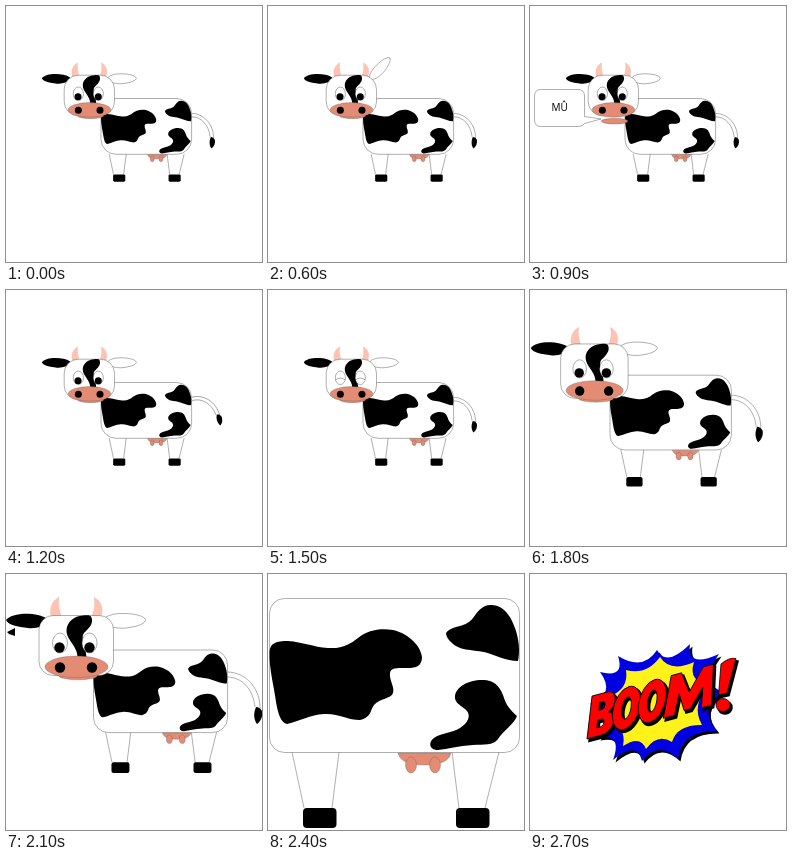
An HTML page that plays this animation: 256 by 256 pixels, repeating every 3 s.

```html
<!DOCTYPE html>
<html lang="en">
<head>
<meta charset="utf-8">
<title>Cow</title>
<style>
html, body { margin: 0; width: 100%; height: 100%; overflow: hidden; background: #fff; }
svg { display: block; width: 100%; height: 100%; }
#cow *, #bubble path { vector-effect: non-scaling-stroke; }
.line { fill: #fff; stroke: #000; stroke-width: .32; }
.open { fill: none; stroke: #000; stroke-width: .32; }
.skin { fill: #e38b73; stroke: #555; stroke-width: .3; }
.horn { fill: #ffc2b3; stroke: #d99; stroke-width: .2; }
text { font: 10px "Open Sans", "Noto Sans", sans-serif; }
</style>
</head>
<body>
<svg viewBox="0 0 256 256">
  <defs>
    <g id="letters" fill-rule="evenodd">
      <g transform="matrix(1.03 -.28 -.13 1.1 57 165)">
        <path d="M0 0V-39H14C26 -39 26 -23 18 -20C28 -18 27 0 14 0ZM8.500 -31V-24H11C15 -24 15 -31 11 -31ZM8.500 -15V-8H12C16 -8 16 -15 12 -15Z"/>
        <path id="o" d="M22.500 -19a13.500 19.500 0 1 1 27 0a13.500 19.500 0 1 1 -27 0ZM31.500 -19a4.500 10 0 1 0 9 0a4.500 10 0 1 0 -9 0Z"/>
        <use href="#o" x="25"/>
        <path d="M74 0L77 -38H87L97 -18L108 -38H118L121 0H111L110 -19L100 -2H94L87 -19L85 0Z"/>
      </g>
      <path d="M191 90Q199 83 206 84.500L197 119L188.500 121Z"/>
      <ellipse cx="193" cy="131" rx="7" ry="6.500"/>
    </g>
    <path id="burst"/>
  </defs>

  <g id="cow">
    <g id="tail">
      <g transform="translate(35.88 41.15) scale(.6757)">
        <path class="open" d="M221 98C240 98 255 115 254 136M221 103C236 103 247 115 249 133"/>
        <path d="M250 133C247 140 248 146 251 150C255 147 257 142 256 137C254 134 252 133 250 133Z"/>
      </g>
    </g>
    <g transform="translate(94.46 83.62) scale(.3623)">
      <path class="open" d="M24 178L36 234M71 178L64 234M184 178L191 234M231 178L217 234"/>
      <rect x="35" y="234" width="33.5" height="20" rx="4"/>
      <rect x="188" y="234" width="33.5" height="20" rx="4"/>
    </g>
    <rect id="body" class="line" x="95" y="92.5" width="90.6" height="55.8"/>
    <g transform="translate(94.46 83.62) scale(.3623)">
      <path d="M1.500 78C2 69 8 67 20 67C35 68 45 73 60 74C75 75 82 70 90 64C100 56 112 54 125 56C142 60 153 73 154 83C154 92 148 94 140 94C130 94 123 93 122 99C121 106 127 113 125 119C123 125 112 124 106 131C102 136 104 143 92 146C80 146 70 139 56 140C42 141 32 147 19 150C13 149 10 140 8 128C6 112 1 95 1.500 78Z"/>
      <path d="M178 59C183 52 192 54 201 48C208 43 210 32 222 31C235 30 243 42 247 54C251 65 252 77 250 87C238 87 228 81 216 78C204 76 190 76 184 69C180 66 178 62 178 59Z"/>
      <path d="M187 122C188 113 200 106 214 106C228 106 232 114 235 121C238 131 242 136 249 142C246 150 236 156 230 165C225 172 216 170 205 171C190 172 180 175 170 176C160 176 161 167 166 164C173 159 184 159 192 154C200 149 203 142 199 137C195 132 186 130 187 122Z"/>
      <path class="skin" d="M130 179H183C181 187 173 191 156 191C140 191 132 187 130 179Z"/>
      <ellipse class="skin" cx="143" cy="191" rx="5.500" ry="8"/>
      <ellipse class="skin" cx="167" cy="191" rx="5.500" ry="8"/>
      <path id="belly" class="open" d="M130 179H183"/>
    </g>
    <g id="head" transform="translate(35.88 41.15) scale(.6757)">
      <path d="M0 46C4 40 20 38 32 41C40 43 44 46 42 48C38 52 30 55 22 54C12 53 2 51 0 46Z"/>
      <path id="ear" class="line" d="M97 46C100 41 110 39 120 39.5C130 40 138 42 140 46C138 51 128 53 120 54C110 55 97 52 97 46Z"/>
      <path class="horn" d="M45 43C43 34 46 27 53 23C52 30 53 35 55 42Z"/>
      <path class="horn" d="M86 42C89 35 89 30 88 23C95 27 98 34 95 43Z"/>
      <rect id="face" class="line" x="33" y="41.5" width="74.5" height="60"/>
      <path d="M85.500 43.500C88 50 82 55 78 59C74 64 80 72 80.500 84H71.500C72 72 60 66 60.500 56C61 48 68 42 77 41.500C81 41 85 41 85.500 43.500Z"/>
      <ellipse class="line" cx="54" cy="69" rx="7.5" ry="10"/>
      <ellipse class="line" cx="83.5" cy="69" rx="7.5" ry="10"/>
      <g id="pupils">
        <circle cx="53.5" cy="73.5" r="5.2"/>
        <circle cx="83.5" cy="73.5" r="5.2"/>
      </g>
      <path id="lids" class="open" d="M46.8 72Q54 67 61.2 72M76.3 72Q83.5 67 90.7 72"/>
      <ellipse id="lip" class="skin" cx="72" cy="101.500" rx="19.500" ry="4.300"/>
      <ellipse class="skin" cx="70.5" cy="92.800" rx="31.5" ry="10.800"/>
      <circle cx="54" cy="93.5" r="5.2"/>
      <circle cx="86" cy="93.5" r="5.2"/>
    </g>
  </g>

  <path id="chip" d="M1 58L9 54V62L3 60Z"/>

  <g id="bubble">
    <path class="line" d="M11 83.5H48Q54.5 83.5 54.5 90V110.5L71 113L54.5 117.5Q53 120.5 48 120.5H11Q4.5 120.5 4.5 114V90Q4.5 83.5 11 83.5Z"/>
    <text x="21.5" y="105">MÛ</text>
  </g>

  <g id="boom">
    <use href="#burst" x="2.5" y="2.5"/>
    <use href="#burst" fill="#0000e1"/>
    <path id="flash" fill="#fff21a"/>
    <use href="#letters" x="2" y="2.5" stroke="#000" stroke-width="1.6"/>
    <use href="#letters" fill="#f00" stroke="#000" stroke-width=".8"/>
  </g>
</svg>
<script>
const STEP = 300, COUNT = 10;
const el = id => document.getElementById(id);
const show = (id, on) => el(id).setAttribute("display", on ? "inline" : "none");
const turn = (id, angle, x, y) => el(id).setAttribute("transform", `rotate(${angle} ${x} ${y})`);

// Joins the tips with arcs that sag towards the middle
function star(tips, pull) {
  const sag = (a, b, mid) => (a + b) / 2 * (1 - pull) + mid * pull;
  return tips.reduce((d, [x, y], i) => {
    const [nx, ny] = tips[(i + 1) % tips.length];
    return `${d}Q${sag(x, nx, 124)} ${sag(y, ny, 130)} ${nx} ${ny}`;
  }, `M${tips[0]}`) + "Z";
}

el("burst").setAttribute("d", star([
  [70, 98], [88, 82], [127, 76], [160, 70], [189, 80], [194, 118], [187, 157],
  [148, 185], [112, 187], [83, 186], [68, 164], [60, 130]
], .36));
el("flash").setAttribute("d", star([
  [96, 96], [130, 83], [164, 88], [180, 110], [172, 151],
  [142, 168], [116, 175], [93, 172], [78, 152], [80, 122]
], .3));

// Where the body's top left corner sits, and the zoom, for each close-up step
const zooms = { 6: [80, 85.2, 1.34], 7: [87.5, 76, 1.48], 8: [1.5, 24.5, 2.76] };

function draw(step) {
  const [x, y, s] = zooms[step] || [95, 92.5, 1];
  const blink = step === 1 || step === 5;
  const moo = step === 3;

  el("cow").setAttribute("transform", `translate(${x - 95 * s} ${y - 92.5 * s}) scale(${s})`);
  el("body").setAttribute("rx", 15 / s);
  el("face").setAttribute("rx", 21 / s);
  el("lip").setAttribute("cy", moo ? 109.5 : 101.5);
  turn("ear", step === 2 ? -46 : 0, 98, 46);
  turn("tail", step === 4 ? -16 : 0, 185, 107);

  show("cow", step < 9);
  show("head", step < 8);
  show("tail", step < 8);
  show("pupils", !blink);
  show("lids", blink);
  show("belly", step === 1);
  show("bubble", moo);
  show("chip", step === 7);
  show("boom", step === 9);
}

const start = performance.now();
function tick() {
  draw(Math.floor((performance.now() - start) / STEP) % COUNT);
  requestAnimationFrame(tick);
}
tick();
</script>
</body>
</html>
```
